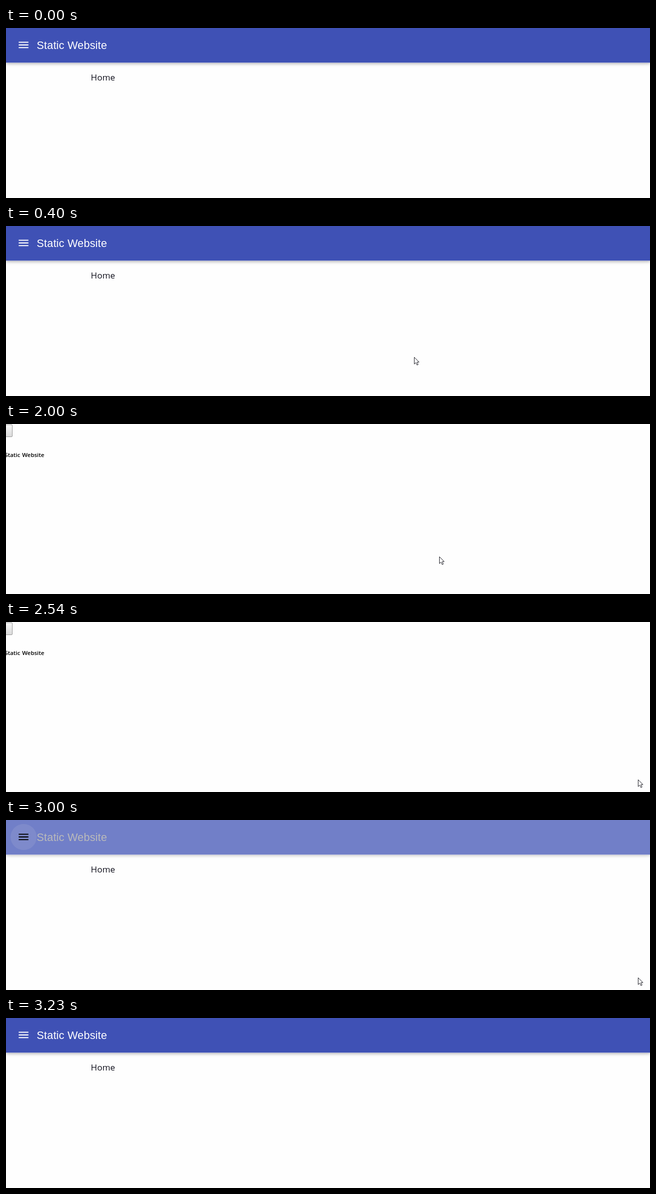
These frames come from a looping animation (1280 by 340 pixels, 3480 ms). An HTML page:

```html
<!DOCTYPE html>
<html lang="en">
<head>
<meta charset="utf-8">
<title>Static Website</title>
<style>
  html, body { margin: 0; width: 100%; height: 100%; overflow: hidden; background: #fefefe; }
  #stage { position: relative; width: 1280px; height: 340px; overflow: hidden; }
  #stage * { position: absolute; white-space: nowrap; }
  #bar { left: 0; top: 0; width: 1280px; height: 69px; background: #fcfffe; }
  #fill {
    inset: 0; background: #3f51b5;
    box-shadow: 0 2.1px 4.3px -1px rgba(0,0,0,.2), 0 4.3px 5.4px rgba(0,0,0,.14), 0 1px 10.7px rgba(0,0,0,.12);
  }
  #fill::after { content: ""; position: absolute; left: 0; top: 69px; width: 100%; height: 1px; background: #b3b8da; }
  #disc { left: 9px; top: 8px; width: 52px; height: 52px; border-radius: 50%; background: #ddd; }
  #menu { left: 22.1px; top: 21.1px; width: 25.8px; height: 25.8px; }
  #title { left: 61px; top: 22px; font: 21.6px/25px "Liberation Sans", Arial, sans-serif; letter-spacing: .0075em; }
  #home { left: 168.6px; top: 87px; font: 17px/24px "Open Sans", sans-serif; color: #10101c; }
  #plain { left: 0; top: 0; width: 76px; height: 80px; }
  #button {
    left: -30px; top: 1px; width: 41px; height: 23px; border: 1px solid #999; border-radius: 2px;
    background: linear-gradient(#f6f6f6, #dadada);
  }
  #heading { right: 0; top: 54px; font: 600 11.4px/16px "Open Sans", sans-serif; word-spacing: 1px; color: #000; }
  #cursor { left: 0; top: 0; width: 12px; height: 18px; }
</style>
</head>
<body>
<div id="stage">
  <div id="app">
    <div id="bar"><div id="fill"></div></div>
    <div id="disc"></div>
    <svg id="menu" viewBox="0 0 24 24"><path d="M3 18h18v-2H3zM3 13h18v-2H3zM3 8h18V6H3z" fill="currentColor"/></svg>
    <div id="title">Static Website</div>
    <div id="home">Home</div>
  </div>
  <div id="plain">
    <div id="button"></div>
    <div id="heading">Static Website</div>
  </div>
  <svg id="cursor" viewBox="0 0 12 18"><path d="M.5.5v13.6l3.2-3 2.2 5 2.3-1-2.2-4.9h4z" fill="#fff" stroke="#1c1c24"/></svg>
</div>
<script>
const LOOP = 3480, TICK = 230 / 3;       // the screen refreshes once per tick
const RELOAD = 530, STYLED = 2920;       // unstyled page between these times
const ENTER = 130, LEAVE = 3230;         // pointer is on the page

// Pointer moves
const entry = { x: 1280, y: 256 };
const moves = [
  { from: ENTER, to: 390, x: 811, y: 262 },
  { from: 1924, to: 2000, x: 861, y: 265 },
  { from: 2000, to: 2230, x: 1255, y: 326 },
  { from: 2307, to: 2537, x: 1256, y: 315 },
  { from: 2997, to: LEAVE, x: 1276, y: 320 }
];

const el = id => document.getElementById(id);
const show = (id, on) => { el(id).style.display = on ? "block" : "none"; };
const progress = (t, from, to) => Math.min(1, Math.max(0, (t - from) / (to - from)));
const easeOut = u => 1 - (1 - u) ** 3;
const grey = p => `rgb(${Array(3).fill(Math.round(p * 255))})`;
const snap = t => 2000 + Math.floor((t - 1996) / TICK) * TICK;

function pointerAt(t) {
  let { x, y } = entry;
  for (const m of moves) {
    const u = progress(t, m.from, m.to);
    x += (m.x - x) * u;
    y += (m.y - y) * u;
  }
  return `translate(${Math.round(x)}px, ${Math.round(y)}px)`;
}

function draw(t) {
  const seen = snap(t);
  const styled = t < RELOAD || t >= STYLED;
  const age = t < RELOAD ? LOOP : seen - STYLED;
  const fade = (delay, length) => easeOut(progress(age, delay, delay + length));

  show("app", styled);
  show("plain", !styled);
  show("cursor", t >= ENTER && t < LEAVE);
  el("cursor").style.transform = pointerAt(seen);
  el("fill").style.opacity = fade(0, 217);
  el("title").style.color = grey(fade(0, 217));
  el("menu").style.color = grey(fade(TICK, 217));
  el("disc").style.opacity = 1 - fade(0, 150);
}

const start = performance.now();
function tick() {
  draw((performance.now() - start) % LOOP);
  requestAnimationFrame(tick);
}
tick();
</script>
</body>
</html>
```
